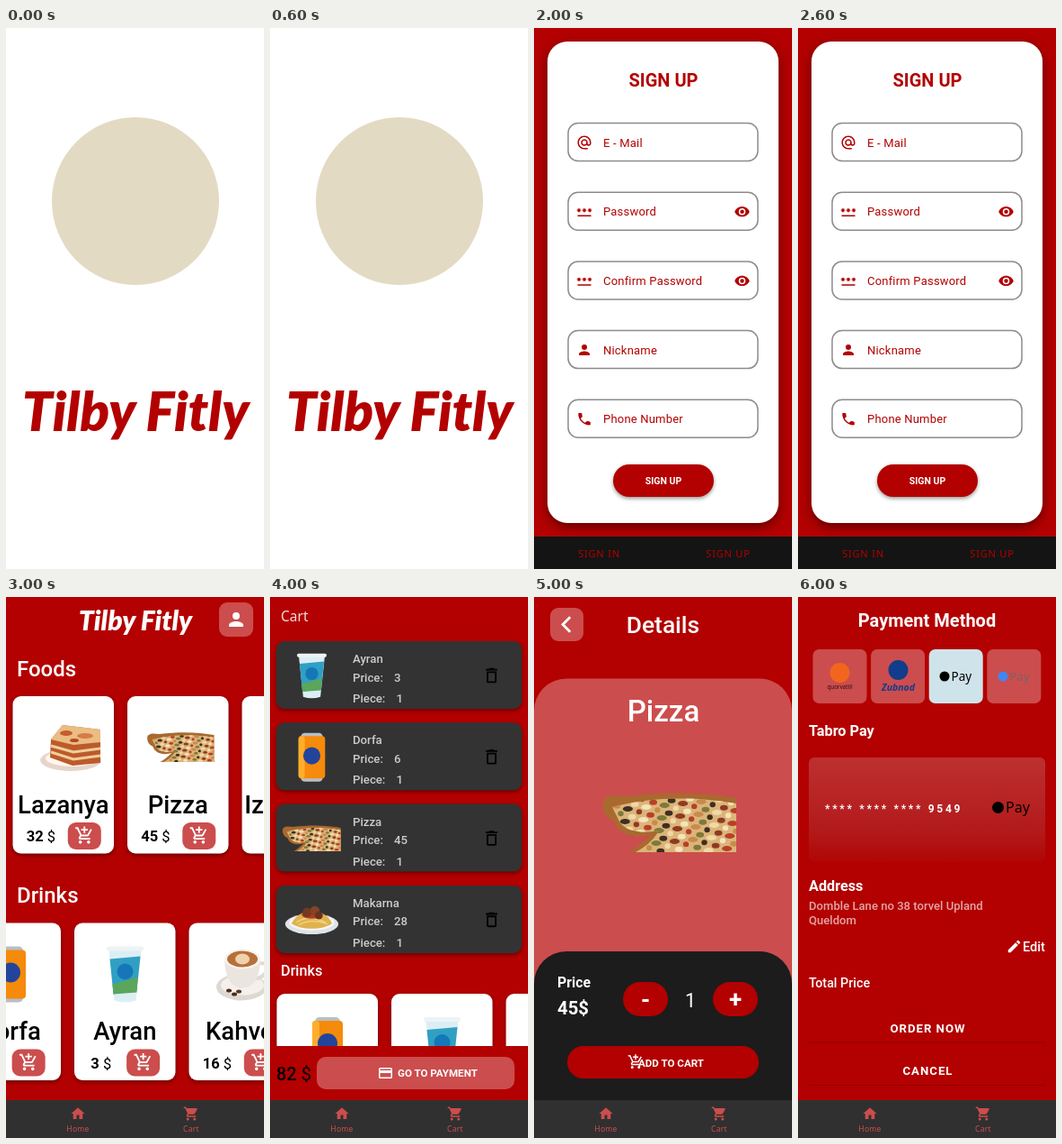
Animation, 287 px wide and 600 px high, one loop 7000 ms. Source, as an HTML page:

```html
<!DOCTYPE html>
<html lang="en">
<head>
<meta charset="utf-8">
<title>Food ordering app</title>
<style>
  html, body { margin: 0; height: 100%; overflow: hidden; background: #fff; }
  #stage { display: block; width: 100vw; height: 100vh; font-family: Roboto, sans-serif; }
  text { white-space: pre; }
  .m { font-weight: 500; }
  .b { font-weight: 700; }
  .sans { font-family: "Noto Sans", sans-serif; }
  .brand { font: italic 900 60px Lato, sans-serif; }
  .shadow { filter: drop-shadow(0 2px 2px #0006); }
  .deep { filter: drop-shadow(0 4px 6px #0007); }
</style>
</head>
<body>
<svg id="stage" viewBox="0 0 287 600"></svg>
<script>
const RED = '#b30000', ROSE = '#cc4d4d', DARK = '#303030', WHITE = '#fff';

const icons = {
  home: 'M10 20v-6h4v6h5v-8h3L12 3 2 12h3v8z',
  cart: 'M7 18a2 2 0 1 0 0 4 2 2 0 0 0 0-4zM1 2v2h2l3.6 7.59-1.35 2.45c-.16.28-.25.61-.25.96 0 1.1.9 2 2 2h12v-2H7.42c-.14 0-.25-.11-.25-.25l.03-.12.9-1.63h7.45c.75 0 1.41-.41 1.75-1.03l3.58-6.49A1 1 0 0 0 20 4H5.21l-.94-2zM17 18a2 2 0 1 0 0 4 2 2 0 0 0 0-4z',
  addCart: 'M11 9h2V6h3V4h-3V1h-2v3H8v2h3zM7 18a2 2 0 1 0 0 4 2 2 0 0 0 0-4zM17 18a2 2 0 1 0 0 4 2 2 0 0 0 0-4zM7.17 14.75l.03-.12.9-1.63h7.45c.75 0 1.41-.41 1.75-1.03l3.86-7.01L19.42 4l-3.87 7H8.53L4.27 2H1v2h2l3.6 7.59-1.35 2.45c-.16.28-.25.61-.25.96 0 1.1.9 2 2 2h12v-2H7.42c-.13 0-.25-.11-.25-.25z',
  person: 'M12 12a4 4 0 1 0 0-8 4 4 0 0 0 0 8zm0 2c-2.67 0-8 1.34-8 4v2h16v-2c0-2.66-5.33-4-8-4z',
  eye: 'M12 4.5C7 4.5 2.73 7.61 1 12c1.73 4.39 6 7.5 11 7.5s9.27-3.11 11-7.5c-1.73-4.39-6-7.5-11-7.5zM12 17a5 5 0 1 1 0-10 5 5 0 0 1 0 10zm0-8a3 3 0 1 0 0 6 3 3 0 0 0 0-6z',
  phone: 'M6.62 10.79c1.44 2.83 3.76 5.14 6.59 6.59l2.2-2.2c.27-.27.67-.36 1.02-.24 1.12.37 2.33.57 3.57.57.55 0 1 .45 1 1V20c0 .55-.45 1-1 1C10.6 21 3 13.4 3 4c0-.55.45-1 1-1h3.5c.55 0 1 .45 1 1 0 1.25.2 2.45.57 3.57.11.35.03.74-.25 1.02z',
  at: 'M12 2C6.48 2 2 6.48 2 12s4.48 10 10 10h5v-2h-5c-4.34 0-8-3.66-8-8s3.66-8 8-8 8 3.66 8 8v1.43c0 .79-.71 1.57-1.5 1.57s-1.5-.78-1.5-1.57V12a5 5 0 1 0-1.46 3.53c.65.89 1.77 1.47 2.96 1.47 1.97 0 3.5-1.6 3.5-3.57V12c0-5.52-4.48-10-10-10zm0 13a3 3 0 1 1 0-6 3 3 0 0 1 0 6z',
  password: 'M2 17h20v2H2z' + [4, 12, 20].map(x => `M${x - .85} 12.95l.85-1.48.85 1.48 1.3-.75-.85-1.48H${x + 3}v-1.5h-1.7l.85-1.47-1.3-.75-.85 1.47-.85-1.47-1.3.75.85 1.47H${x - 3}v1.5h1.7l-.85 1.48z`).join(''),
  trash: 'M16 9v10H8V9zM14.5 3h-5l-1 1H5v2h14V4h-3.5zM18 7H6v12c0 1.1.9 2 2 2h8c1.1 0 2-.9 2-2z',
  card: 'M20 4H4a2 2 0 0 0-2 2v12c0 1.1.9 2 2 2h16a2 2 0 0 0 2-2V6a2 2 0 0 0-2-2zm0 14H4v-6h16zm0-10H4V6h16z',
  edit: 'M3 17.25V21h3.75L17.81 9.94l-3.75-3.75zM20.71 7.04a1 1 0 0 0 0-1.41l-2.34-2.34a1 1 0 0 0-1.41 0l-1.83 1.83 3.75 3.75z',
  back: 'M15.5 2l-10 10 10 10 2.2-2.2L9.9 12l7.8-7.8z'
};

const rect = (x, y, w, h, fill, r = 0, attrs = '') =>
  `<rect x="${x}" y="${y}" width="${w}" height="${h}" rx="${r}" fill="${fill}" ${attrs}/>`;
const circle = (x, y, r, fill) => `<circle cx="${x}" cy="${y}" r="${r}" fill="${fill}"/>`;
const oval = (x, y, rx, ry, fill) => `<ellipse cx="${x}" cy="${y}" rx="${rx}" ry="${ry}" fill="${fill}"/>`;
const path = (d, fill, attrs = '') => `<path d="${d}" fill="${fill}" ${attrs}/>`;
const text = (x, y, size, str, fill = WHITE, cls = 'm', attrs = '') =>
  `<text x="${x}" y="${y}" font-size="${size}" fill="${fill}" class="${cls}" ${attrs}>${str}</text>`;
const mid = (x, y, size, str, fill, cls, attrs = '') =>
  text(x, y, size, str, fill, cls, 'text-anchor="middle" ' + attrs);
const spaced = n => `letter-spacing="${n}"`;
const icon = (name, x, y, size, fill = WHITE) =>
  path(icons[name], fill, `fill-rule="evenodd" transform="translate(${x - size / 2} ${y - size / 2}) scale(${size / 24})"`);
const place = (x, y, scale, art) => `<g transform="translate(${x} ${y}) scale(${scale})">${art}</g>`;
const brand = (x, y, scale, fill) =>
  place(x, y, scale, `<text class="brand" text-anchor="middle" fill="${fill}">Tilby Fitly</text>`);

// Food pictures, each centred on 0,0 and about 70 wide
const cheese = 'M-32-9C-10-15 15-15 37-11V16H-19C-13 13-8 8-6 4C-17 6-25 4-28-1Z';
const toppings = Array.from({ length: 90 }, (_, i) =>
  oval(-32 + i * .618 % 1 * 70, -14 + i / 3, 2.8 - i % 3 * .6, 1.5,
    ['#b8402a', '#f4e4bb', '#8f3a22', '#efd9a6', '#3d2f22', '#7d7a3a', '#c98b4c'][i % 7])).join('');
const food = {
  pizza: path('M-37-13C-33-17-28-15-24-15C0-18 20-17 37-14V16H-23C-17 13-14 9-10 6C-20 9-29 6-31-1C-37-4-38-9-37-13Z', '#a9692f') +
    path(cheese, '#dcb479') + `<clipPath id="slice">${path(cheese)}</clipPath><g clip-path="url(#slice)">${toppings}</g>`,
  lasagna: oval(0, 14, 34, 12, '#e6d5cb') + oval(2, 12, 30, 9, '#fff5ee') +
    path('M-22-9L-9-25 33-20V17L2 20-23 11Z', '#bd5a2c') + path('M-22-9L-9-25 33-20V-6L3-3Z', '#e9bd83') +
    path('M-22-2L3 5 33 1M-22 5L3 13 33 9', 'none', 'stroke="#f0cf98" stroke-width="3"') +
    oval(-5, -16, 7, 3, '#c85a30') + oval(16, -13, 9, 3, '#d87b44') + oval(4, -8, 5, 2, '#b94626'),
  can: rect(-14, -31, 28, 62, '#b9bec4', 5) + rect(-17, -27, 34, 54, '#f58a0b', 4) +
    rect(-17, -27, 8, 54, '#ffad2b', 4) + circle(0, -2, 11, '#23449b'),
  cup: path('M-18-27H18L12 29Q0 33-12 29Z', '#dceef5') + path('M-17-17L17-20 13 18-13 22Z', '#2fa0c4') +
    path('M-14 11L14 3 13 20-13 22Z', '#5aa65b') + rect(-20.5, -31, 41, 5, '#eef3f5', 2) + circle(0, -3, 9, '#1776b8'),
  coffee: oval(0, 14, 28, 15, '#ded8d2') + oval(1, 12, 24, 11, '#f4f0ec') +
    path('M19-12Q34-14 27-2Q23 4 15 5', 'none', 'stroke="#e1dad3" stroke-width="4"') +
    path('M-19-16C-18 4-12 15 1 15S20 4 21-16Z', '#ebe5df') + oval(1, -17, 20, 11, '#f7f3ef') +
    oval(1, -17, 17, 9, '#b8703a') + oval(1, -17, 8, 6, '#efd2ac') +
    oval(-14, 18, 3, 2, '#4b2b1b') + oval(-8, 22, 3, 2, '#4b2b1b') + oval(-3, 19, 3, 2, '#5d3721'),
  pasta: oval(0, 5, 34, 13, '#dfe3e6') + oval(0, 3, 29, 10, '#f5f6f6') +
    path('M-26 4C-20-6-12-11 0-11S21-6 26 4C14 13-14 13-26 4Z', '#dfb24f') +
    path('M-20 3Q-4-8 18 3M-17 6Q0-3 20 5', 'none', 'stroke="#f2d37e" stroke-width="1.5"') +
    oval(0, -7, 13, 5, '#b33a1e') + circle(-6, -10, 6, '#74391f') + circle(4, -12, 6, '#834326') + circle(9, -6, 5, '#6a321c')
};

const nav = rect(0, 558, 287, 42, DARK) +
  [['home', 80, 'Home'], ['cart', 206, 'Cart']].map(([name, x, label]) =>
    icon(name, x, 573, 18, ROSE) + mid(x, 593, 8.5, label, ROSE, 'sans', spaced(.3))).join('');
const red = rect(0, 0, 287, 600, RED);

const field = (x, y, w, name, label, eye) =>
  rect(x, y, w, 42, WHITE, 11, 'stroke="#8c8c8c" stroke-width="1.5"') +
  icon(name, x + 18, y + 21.5, 18, RED) + text(x + 39, y + 26, 13, label, RED, '', spaced(.2)) +
  (eye ? icon('eye', x + w - 17.5, y + 21.5, 18, RED) : '');
const form = content => red + rect(15, 15, 257, 534, WHITE, 22, 'class="deep"') + content +
  rect(0, 564, 287, 36, '#141414') +
  mid(72.5, 587, 11, 'SIGN IN', RED, 'sans', spaced(.8)) + mid(216, 587, 11, 'SIGN UP', RED, 'sans', spaced(.8));
const pill = (x, y, w, label) => rect(x, y, w, 36, RED, 18, 'class="shadow"') + mid(x + w / 2, y + 22, 10.5, label, WHITE, 'b');

// Price and button share the card's width with equal gaps
const product = (x, y, art, label, price, dx = 0) => {
  const priceWidth = 14 + 9.4 * price.length, gap = (75.5 - priceWidth) / 3, buttonX = gap * 2 + priceWidth;
  return rect(x, y, 112.5, 174.5, WHITE, 9, 'class="shadow"') +
    `<svg x="${x}" y="${y}" width="112.5" height="174.5">` +
    (art ? place(56.5 + dx, 57, 1, food[art]) : '') + mid(56.3, 129.5, 27.4, label, '#000') +
    (price && text(gap + 1, 161, 16.5, `${price}<tspan font-weight="400"> $</tspan>`, '#000', 'b')) +
    rect(buttonX, 140, 37, 30, ROSE, 9) + icon('addCart', buttonX + 18.5, 154.5, 22) + '</svg>';
};

const cartItem = (i, art, label, price, scale) => {
  const y = 49 + i * 90.3, line = (dx, dy, str) => text(92 + dx, y + dy, 13.2, str, '#ccc');
  return rect(7, y, 273, 75, '#333', 9, 'class="shadow"') + place(46.5, y + 38.5, scale, food[art]) +
    line(0, 24, label) + line(0, 44.5, 'Price:') + line(46, 44.5, price) +
    line(0, 68, 'Piece:') + line(48.5, 68, 1) + icon('trash', 246.5, y + 38, 22, '#000');
};

const tile = (i, fill, content) => rect(16.5 + i * 64.6, 58, 60, 60, fill, 7) + content;
const payMark = (x, y, r, size, color, ink = color) =>
  circle(x, y, r, color) + text(x + r + 2, y + size * .35, size, 'Pay', ink, 'sans');
const action = (y, label) => mid(144.5, y, 13.2, label, WHITE, 'b', spaced(1)) + rect(12, y + 11, 263, 1, '#8e0000');

const scenes = [
  rect(0, 0, 287, 600, WHITE) + circle(144, 192, 93, '#e3dac3') + brand(144, 447, 1, RED),

  form(brand(144, 118, .667, RED) + field(53, 200, 181, 'at', 'E - Mail') +
    field(53, 314.5, 181, 'password', 'Password', true) + pill(69, 431, 149, 'SIGN IN')),

  form(mid(144, 65, 20, 'SIGN UP', RED, 'b') +
    [['at', 'E - Mail'], ['password', 'Password', true], ['password', 'Confirm Password', true],
      ['person', 'Nickname'], ['phone', 'Phone Number']].map((f, i) => field(38, 105.5 + i * 76.7, 211, ...f)).join('') +
    pill(88, 484, 112, 'SIGN UP')),

  red + brand(144, 37, .5, WHITE) + rect(237, 6, 38, 38, ROSE, 9) + icon('person', 256, 25, 24) +
  text(12, 88, 24, 'Foods') + product(7.5, 110, 'lasagna', 'Lazanya', '32', 8) +
  product(135, 110, 'pizza', 'Pizza', '45', 3) + product(262.5, 110, '', 'Izgara Et', '') +
  text(12, 339, 24, 'Drinks') + product(-51.5, 361.5, 'can', 'Dorfa', '6') +
  product(76, 361.5, 'cup', 'Ayran', '3') + product(203.5, 361.5, 'coffee', 'Kahve', '16', 2) + nav,

  red + text(12, 27, 15.5, 'Cart', '#f3dede', 'sans') +
  cartItem(0, 'cup', 'Ayran', 3, .8) + cartItem(1, 'can', 'Dorfa', 6, .87) +
  cartItem(2, 'pizza', 'Pizza', 45, .87) + cartItem(3, 'pasta', 'Makarna', 28, .87) +
  text(12, 420, 16.3, 'Drinks') + product(7.5, 440, 'can', '', '') + product(135, 440, 'cup', '', '') +
  product(262.5, 440, '', '', '') + rect(0, 498, 287, 60, RED) +
  text(7, 535.5, 20, '82<tspan font-weight="400"> $</tspan>', '#000') + rect(52, 510, 220, 36, ROSE, 10) +
  icon('card', 128.5, 528, 18) + text(142, 532, 11.6, 'GO TO PAYMENT', WHITE, 'b') + nav,

  red + rect(18, 12, 37, 37, ROSE, 9) + icon('back', 36, 30.5, 22) + mid(143.5, 40, 26.3, 'Details') +
  rect(0, 90.5, 287, 480, ROSE, 36) + mid(144, 138, 33, 'Pizza') + place(151, 251, 2, food.pizza) +
  rect(0, 393, 287, 220, '#1c1c1c', 36) + text(26, 433, 15.8, 'Price', WHITE, 'b') + text(26, 463, 20.3, '45$', WHITE, 'b') +
  rect(99, 427, 50, 38, RED, 19) + rect(199, 427, 50, 38, RED, 19) +
  mid(124, 455, 26, '-', WHITE, 'b') + mid(174, 455, 21.5, 1, WHITE, '') + mid(224, 455, 26, '+', WHITE, 'b') +
  rect(37, 498, 213, 36, RED, 18) + icon('addCart', 113, 515.5, 18) + text(116, 520.5, 11.6, 'ADD TO CART', WHITE, 'b') + nav,

  red + mid(143.5, 33, 20, 'Payment Method', WHITE, 'b') +
  tile(0, ROSE, circle(46.5, 84, 11, '#f2651f') + mid(46.5, 102, 6.3, 'quorvatill', '#2b1111', 'sans')) +
  tile(1, ROSE, circle(111.5, 81, 11, '#123c8c') + mid(111.5, 104, 10.5, 'Zubnod', '#123c8c', 'sans b', 'font-style="italic"')) +
  tile(2, '#cfe3ea', payMark(163, 88, 5.5, 13.5, '#000')) +
  tile(3, ROSE, payMark(228, 88, 5.5, 13, '#4285f4', '#74656a')) +
  text(12, 154, 16.3, 'Tabro Pay', WHITE, 'b') +
  '<linearGradient id="sheen" x2="0" y2="1"><stop stop-color="#bd3030"/><stop offset=".7" stop-color="#b31a1a"/><stop offset="1" stop-color="#b00606"/></linearGradient>' +
  rect(12, 178, 263, 116, 'url(#sheen)', 6) + text(30, 239, 12, '**** **** **** 9549', WHITE, 'b', spaced(2.7)) +
  payMark(222.5, 233.5, 6.5, 16, '#000') + text(12, 325.5, 16.2, 'Address', WHITE, 'b') +
  text(12, 347, 13.1, 'Domble Lane no 38 torvel Upland', '#e3a6a6') + text(12, 362.5, 13.1, 'Queldom', '#e3a6a6') +
  icon('edit', 240.5, 387.5, 18) + text(250, 393, 14.5, 'Edit') + text(12, 433, 14.3, 'Total Price') +
  action(482.5, 'ORDER NOW') + action(530, 'CANCEL') + nav
];

const stage = document.getElementById('stage');
let shown = -1;
function draw() {
  const current = Math.floor(performance.now() / 1000) % scenes.length;
  if (current !== shown) stage.innerHTML = scenes[shown = current];
  requestAnimationFrame(draw);
}
draw();
</script>
</body>
</html>
```
